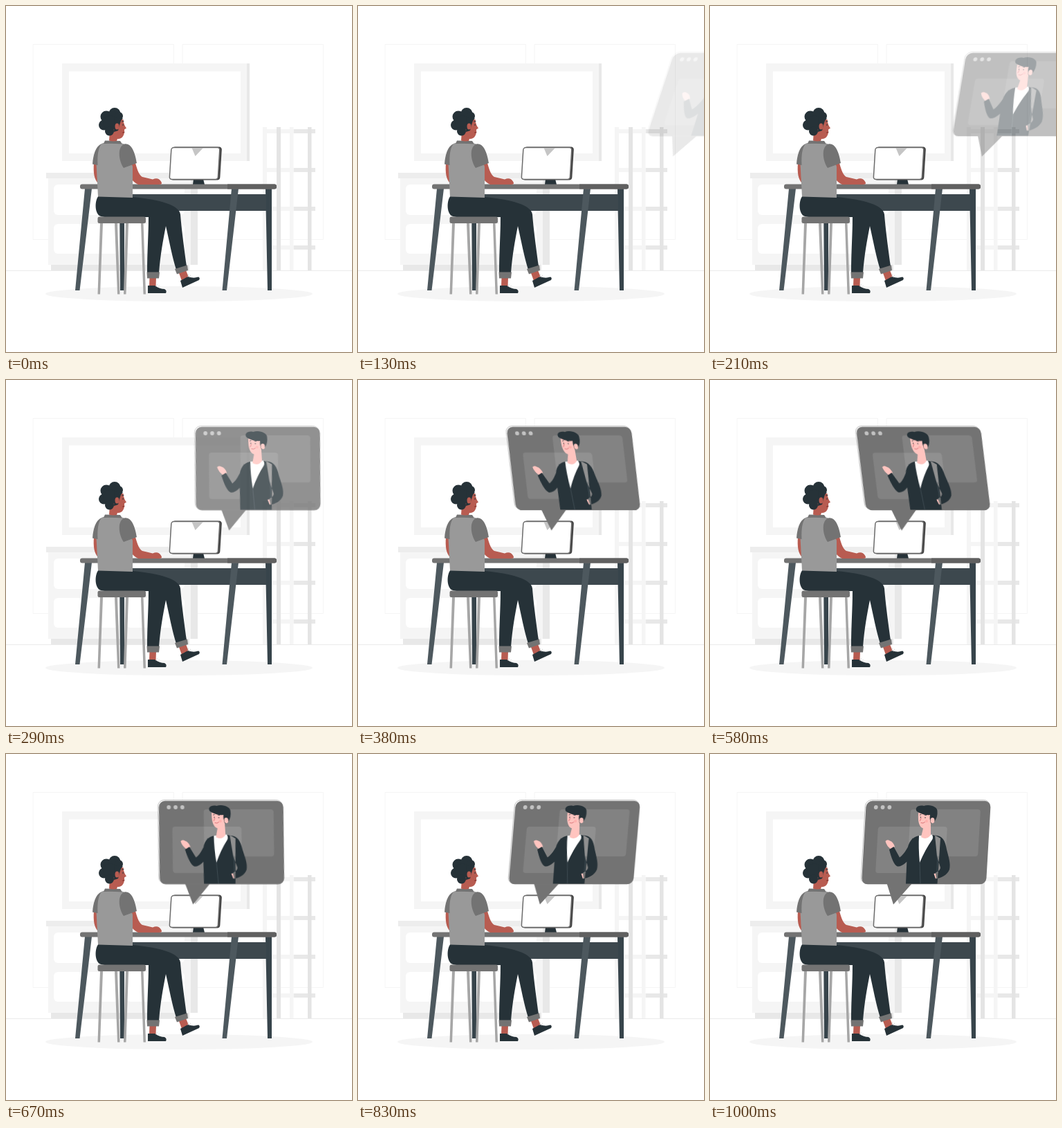
An HTML page that plays this animation: 500x500 px, repeating every 1040 ms.

```html
<!DOCTYPE html>
<html lang="en">
<head>
<meta charset="utf-8">
<title>Video call at a desk</title>
<style>
  html, body { margin: 0; width: 100%; height: 100%; overflow: hidden; background: #fff; }
  svg { display: block; width: 100%; height: 100%; }
  #bubble { transform-origin: 312px 142px; }
  .dark { fill: #263238; }
  .slate { fill: #37444b; }
  .leg { fill: #4d585e; }
  .grey { fill: #737373; }
  .steel { fill: #a6a6a6; }
  .pale { fill: #f5f5f5; }
  .mist { fill: #e8e8e8; }
  .white { fill: #fff; }
  .skin { fill: #b85c51; }
  .pink { fill: #ffc4bf; }
  .line { fill: none; stroke-linecap: round; }
</style>
</head>
<body>
<svg viewBox="0 0 500 500">
  <!-- room -->
  <g class="line" stroke="#f5f5f5">
    <path d="M39.5 55.500H242.500V337.500H39.500ZM255.500 55.500H458.500V337.500H255.500Z"/>
    <path d="M0 382.500H500" stroke="#ebebeb"/>
  </g>
  <path class="pale" d="M81 83H352V224H81Z"/>
  <path class="mist" d="M348 83H352V224H348Z"/>
  <path class="white" d="M91 94.500H339V213H91Z"/>

  <path class="mist" d="M267 249H277V374H267ZM65 374H265V382H65Z"/>
  <path class="pale" d="M61 249H267V374H61Z"/>
  <path fill="#ededed" d="M58 241H289V249H58Z"/>
  <g class="white">
    <rect x="69" y="258" width="94" height="44" rx="6"/>
    <rect x="174" y="258" width="84" height="44" rx="6"/>
    <rect x="69" y="315" width="94" height="43" rx="6"/>
    <rect x="174" y="315" width="84" height="43" rx="6"/>
  </g>
  <path class="pale" d="M371 175H377V382H371ZM410 175H415.500V382H410Z"/>
  <g id="shelves"></g>
  <path fill="#e4e4e4" d="M391 175H397V382H391ZM436 175H441.500V382H436Z"/>
  <ellipse class="pale" cx="250" cy="416" rx="193" ry="11"/>

  <!-- desk and monitor -->
  <path class="slate" d="M164 264H171V411H165ZM375 264H384V411H378Z"/>
  <path fill="#3d484e" d="M180 272H376V296H180Z"/>
  <path class="leg" d="M114 264H124L106.500 411H100ZM326 264H336L319 411H312.500Z"/>
  <path class="dark" d="M271 250H285L287 258H270Z"/>
  <g transform="skewX(-3.500)">
    <rect x="253" y="203.500" width="71.500" height="48" rx="4" fill="#454545"/>
    <rect x="251.500" y="204.500" width="70" height="46" rx="3.500" fill="#fff" stroke="#6b6b6b" stroke-width="1.500"/>
  </g>
  <path fill="#c5c5c5" d="M268.500 205H285L273.500 217Z"/>
  <rect class="grey" x="107" y="257.500" width="284" height="7" rx="3"/>
  <path fill="#606060" d="M320 257.500H388Q391 257.500 391 261T388 264.500H320Z"/>

  <!-- stool -->
  <path class="steel" d="M136 314H140L136 416.500H132.500ZM157 314H161L164.500 416.500H161ZM173 314H177L173.500 416.500H170ZM195 314H198.500L202 416.500H198.500Z"/>

  <!-- seated figure -->
  <path class="skin" d="M207.500 392H217L216.500 405H207ZM250 386L260 382L264 392L254 397Z"/>
  <path class="dark" d="M205 404H215Q222 409 229 409Q233 411 231 415H205ZM252 397L263 391Q271 394 278 391.500Q281 393 279 396L255 407Z"/>
  <path class="line" stroke="#d8d8d8" stroke-width=".8" d="M217 405L219 402M219.500 406.500L221.500 404M263 391.500L263.500 388M265.500 392L266.500 389"/>
  <path class="dark" d="M134 274C128 281 128 298 135 303Q139 305 146 305H206C206 330 204 355 204 386H221C223 360 227 338 231 318C236 340 240 362 246 381L261 376C256 340 253 315 252 301C250 288 225 280 183 276Z"/>
  <path class="grey" d="M203.500 384.500H222L221 393.500H204ZM244 380L262 374.500L263 382L247 387.500Z"/>
  <rect class="grey" x="132.500" y="304.500" width="69.500" height="9.500" rx="2.500"/>
  <path class="skin" d="M127 227C126 240 127 251 134 257L135 228ZM172 232L187 227C190 238 193 245 197 247L212 250.500Q220 247 224 253.500Q227 258 221 258H191C181 253 176 243 172 232Z"/>
  <path fill="#999" d="M140 198C131 202 130 212 130.500 228L133 275.500L183 277V232L170 199Q153 196 140 198Z"/>
  <path class="grey" d="M138 199C129 203 126 216 125 228.500L132.500 230C132 215 133 206 138 199ZM171 199.500C181 198 186 210 189 227L170 234C162 222 161 203 171 199.500ZM143 194.500L165 195L168 199.500Q153 198.500 141 199Z"/>
  <path class="skin" d="M157 164H169.500C170 169 171 173 174 176.500L171 178.500C172 187 167 193 161 192L160 195Q154 196 149 194.500L150 181Z"/>
  <g class="dark">
    <circle cx="145" cy="160" r="8.500"/><circle cx="157" cy="155.500" r="8.500"/>
    <circle cx="163" cy="159" r="6"/><circle cx="141.500" cy="172" r="7.500"/>
    <circle cx="151" cy="169" r="10.500"/><circle cx="149.500" cy="181" r="6.500"/>
    <path d="M157 162H169L166 166L164 172L162 180L156 182Z"/>
  </g>
  <ellipse class="skin" cx="160.500" cy="174" rx="3" ry="4.500"/>
  <path class="line" stroke="#263238" d="M167.500 167L170 166.500M169 171V172.500"/>
  <path class="line" stroke="#7d2e2a" d="M168.500 183L171 182.500"/>

  <!-- call bubble -->
  <g id="bubble">
    <path class="grey" d="M255.500 187H292L265 217.500Z"/>
    <g transform="skewX(-3.300)">
      <rect x="228.600" y="66.500" width="180" height="121" rx="9" fill="#fff" stroke="#999" stroke-width=".6"/>
      <rect class="grey" x="229.800" y="67.800" width="180" height="120.500" rx="9"/>
      <g fill="#fff" fill-opacity=".11">
        <rect x="294.600" y="80" width="101" height="68" rx="4"/>
        <rect x="249" y="105" width="100" height="67" rx="4"/>
      </g>
      <g fill="#c2c2c2">
        <circle cx="244.200" cy="77" r="2.900"/><circle cx="254" cy="77" r="2.900"/><circle cx="263.800" cy="77" r="2.900"/>
      </g>
    </g>
    <path class="pink" d="M253.500 126Q256 123 260 125.500Q265 127 267 134L262 138Q255 133 253.500 126ZM326 173Q318 170.500 313.500 175Q311 180 318 181L327 179.500Z"/>
    <path class="dark" d="M302 118Q287 121 285 140L283 187.500H328.500L333 122Q328 118 322 117ZM293 121C287 133 281 145 274 149.500L265.500 134L259 138C262 150 266 161 271 162.500C279 163 286 154 291 148ZM325 117.500C336 118 340 125 342 138C345 150 348 158 346 167C343 175 334 179 326 180.500L323.500 173C330 170 333 167 333 164L328 148Z"/>
    <path class="white" d="M302 118L321 116.500Q323 121 321 124Q311 138 303 157Q301 135 302 118Z"/>
    <path class="line" stroke="#55626a" stroke-width=".5" d="M303 156L304 187M329 147L328 172"/>
    <path class="pink" d="M301.500 83C300 94 301 105 308 107.500L305 120Q313 125 319 117V98L320 84Z"/>
    <path class="dark" d="M299 83C295 78 301 73 309 75C317 72 330 76 328.500 84C329 88 327 95 324 98L319 100Q317 93 318 88C310 89 304 86 299 83Z"/>
    <ellipse class="pink" cx="321.500" cy="96" rx="3" ry="4"/>
    <path class="line" stroke="#263238" stroke-width=".9" d="M303.500 88L305 87.500M310 88L312.500 88.500M304.500 91V92M311 91.500V92.500"/>
    <path class="line" stroke="#d4626a" stroke-width=".8" d="M305 93L303.500 96.500M305 99.500Q308 101 310.500 98.500"/>
    <circle cx="313" cy="97" r="2" fill="#ff9c9c" opacity=".5"/>
  </g>
</svg>
<script>
  const LOOP = 1040, STEP = 1000 / 24, LEAD = 10;

  document.getElementById('shelves').innerHTML = [178, 234, 290, 346].map(y =>
    `<path class="pale" d="M377 ${y}h39v6h-39z"/><path class="mist" d="M416 ${y}h31v6h-31z"/>`).join('');

  // Slides in from the right, leans past upright, then settles.
  const bounce = 'cubic-bezier(.36,-.01,.5,1.38)';
  const pose = (x, skew) => `translateX(${x}px) skewX(${skew}deg)`;
  const slide = document.getElementById('bubble').animate([
    { offset: 0, transform: pose(250, -20), opacity: 0, easing: 'cubic-bezier(.43,-.01,.4,1.38)' },
    { offset: .6, transform: pose(0, 10), opacity: 1, easing: bounce },
    { offset: .8, transform: pose(0, -2), opacity: 1, easing: bounce },
    { offset: 1, transform: pose(0, 0), opacity: 1 }
  ], { duration: 1000, fill: 'both' });
  slide.pause();

  const start = performance.now();
  function draw() {
    const t = (performance.now() - start) % LOOP;
    const step = Math.floor((t + 4) / STEP) % 25;
    slide.currentTime = step < 2 ? 0 : step * STEP + LEAD;
    requestAnimationFrame(draw);
  }
  draw();
</script>
</body>
</html>
```
